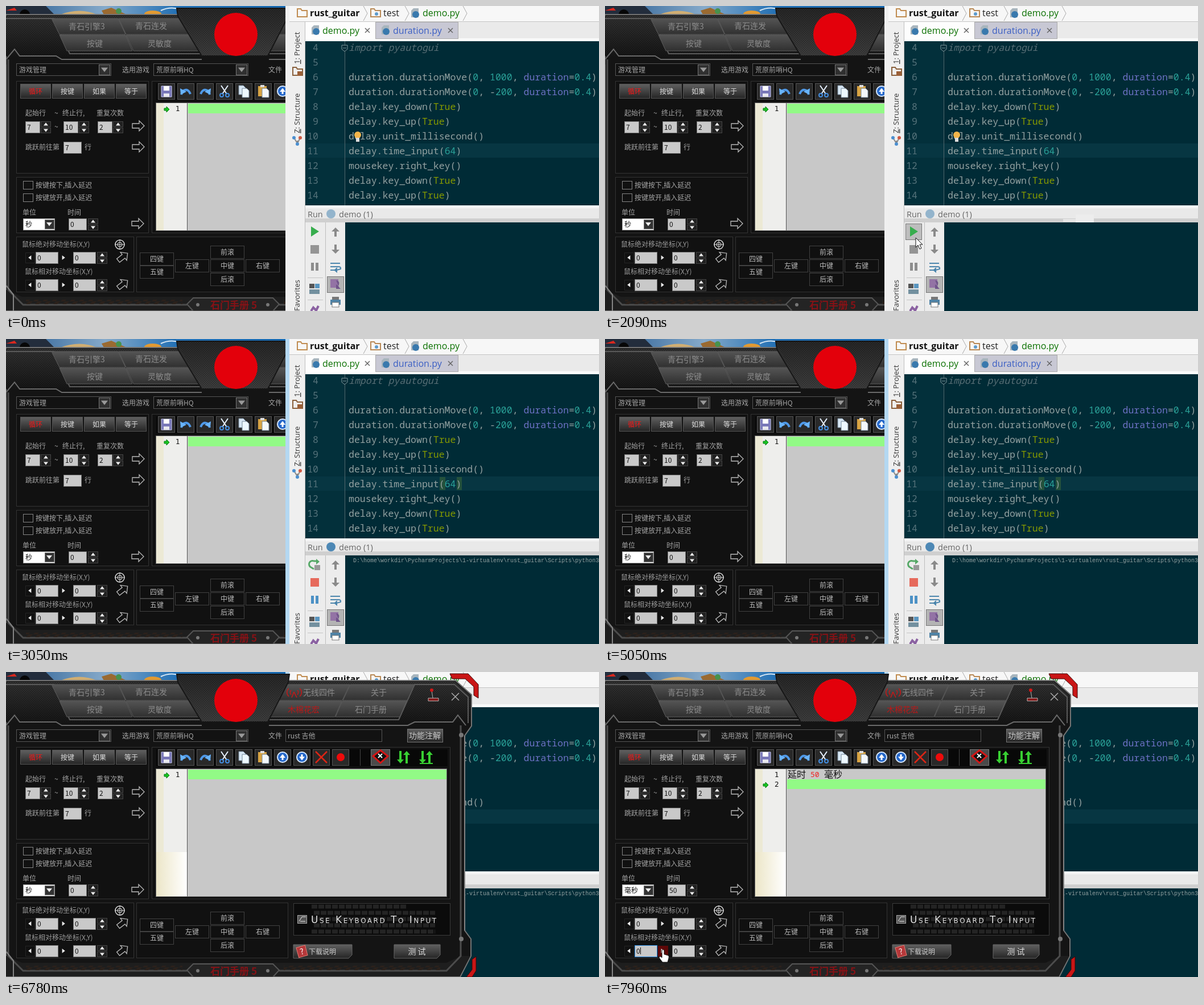
These frames come from a looping animation (1042x537 px, 8000 ms). An HTML page:

```html
<!DOCTYPE html>
<html lang="zh-CN">
<head>
<meta charset="utf-8">
<title>Macro editor</title>
<style>
html, body { margin: 0; width: 100%; height: 100%; overflow: hidden; background: #111; }
svg { display: block; width: 1042px; height: 537px; }
text { font-family: "Noto Sans CJK SC", "Noto Sans CJK", sans-serif; white-space: pre; }
.ui { font-family: "Open Sans", "Noto Sans", sans-serif; }
.code { font-family: "Noto Sans Mono", "DejaVu Sans Mono", monospace; font-size: 16.55px; }
.out { font-family: "Liberation Mono", monospace; font-size: 10px; }
.num { font-family: "DejaVu Sans", sans-serif; }
.wide { font-family: "DejaVu Sans", sans-serif; font-variant: small-caps; letter-spacing: 2.5px; }
</style>
</head>
<body>
<svg id="root" viewBox="0 0 1042 537" xmlns="http://www.w3.org/2000/svg">
<defs>
  <linearGradient id="tab" x2="0" y2="1"><stop stop-color="#545454"/><stop offset="1" stop-color="#303030"/></linearGradient>
  <linearGradient id="plate" x2="0" y2="1"><stop stop-color="#303030"/><stop offset="1" stop-color="#161616"/></linearGradient>
  <linearGradient id="key" x2="0" y2="1"><stop stop-color="#606060"/><stop offset="1" stop-color="#252525"/></linearGradient>
  <linearGradient id="badge" x2="0" y2="1"><stop stop-color="#262626"/><stop offset="1" stop-color="#3c3c3c"/></linearGradient>
  <linearGradient id="sea"><stop stop-color="#26364c"/><stop offset=".1" stop-color="#3f6f9f"/><stop offset=".35" stop-color="#86aaca"/><stop offset=".6" stop-color="#2471b5"/><stop offset="1" stop-color="#1767ad"/></linearGradient>
  <linearGradient id="cream"><stop stop-color="#ece6c8"/><stop offset="1" stop-color="#fff"/></linearGradient>
  <pattern id="mesh" width="4" height="4" patternUnits="userSpaceOnUse"><path d="M0 0h1v1h-1zM2 2h1v1h-1z" fill="#000" opacity=".5"/></pattern>
  <pattern id="hazard" width="16" height="8" patternUnits="userSpaceOnUse"><path d="M0 8L8 0H15L7 8Z" fill="#2b211b"/></pattern>
</defs>
<g id="desk"></g><g id="app"></g><g id="ide"></g><g id="cursor"></g>
</svg>
<script>
const $ = id => document.getElementById(id);
const rect = (x, y, w, h, fill, more = '') => `<rect x="${x}" y="${y}" width="${w}" height="${h}" fill="${fill}" ${more}/>`;
const box = (x, y, w, h, fill, line) => rect(x + .5, y + .5, w - 1, h - 1, fill, `stroke="${line}"`);
const path = (d, fill, line = 'none', width = 1, more = '') => `<path d="${d}" fill="${fill}" stroke="${line}" stroke-width="${width}" ${more}/>`;
const dot = (x, y, r, fill, more = '') => `<circle cx="${x}" cy="${y}" r="${r}" fill="${fill}" ${more}/>`;
const text = (x, y, s, fill = '#a6a6a6', size = 12, more = '') => `<text x="${x}" y="${y}" fill="${fill}" font-size="${size}" ${more}>${s}</text>`;
const mid = (x, y, s, fill, size, more = '') => text(x, y, s, fill, size, 'text-anchor="middle" ' + more);
const group = (id, body) => `<g id="${id}">${body}</g>`;
const at = (x, y, body, turn = 0) => `<g transform="translate(${x} ${y}) rotate(${turn})">${body}</g>`;
const tri = (x, y, turn, fill = '#eee', s = 4) => at(x, y, path(`M${-s} ${s * .6}H${s}L0 ${-s * .7}Z`, fill), turn);

// ---- desktop ----
$('desk').innerHTML = rect(0, 0, 1042, 537, '#10141a') + rect(0, 0, 498, 18, 'url(#sea)') +
  path('M0 0H70L85 15H0Z', '#232d3c') + path('M0 8L15 3L19 8Z', '#d8281f') + dot(33, 15, 9, '#070707') +
  path('M95 15Q130 2 160 15Z', '#d0ae73') + path('M168 8L185 3L212 15H172Z', '#9a6a31') +
  dot(198, 9, 5, '#47924d') + `<ellipse cx="258" cy="14" rx="15" ry="6" fill="#e29a32"/>` +
  path('M272 8Q288 0 308 6Q325 10 345 4', 'none', '#d7e7f4', 2);

// ---- macro tool ----
const line = '#3b3b3b';
const panel = (x, y, w, h) => box(x, y, w, h, '#111', '#333');
const field = (x, y, w, s, id = '') => box(x, y, w, 21, '#c9c9c9', '#777') + text(x + 3, y + 15, s, '#111', 12, id && `id="${id}"`);
const spinner = (x, y) => box(x, y, 18, 10, '#202020', '#444') + box(x, y + 11, 18, 10, '#202020', '#444') +
  tri(x + 9, y + 5, 0) + tri(x + 9, y + 16, 180);
const arrow = (x, y, turn = 0) => at(x, y, path('M-10 -4H2V-9L11 0L2 9V4H-10Z', '#111', '#bbb', 1.3), turn);
const combo = (x, s) => box(x, 101, 167, 22, '#121212', '#555') + text(x + 5, 117, s) +
  box(x + 145, 103, 20, 19, '#303030', '#777') + tri(x + 155, 112, 180, '#999', 6);
const check = (y, s) => box(30, y, 18, 15, '#111', '#858585') + text(52, y + 12, s);
const button = (x, y, s) => box(x, y, 60, 23, '#101010', '#414141') + mid(x + 30, y + 16, s, '#bbb', 12);
const tabs = (shape, x, y, s, fill = '#8b8b8b') => path(shape, 'url(#tab)', '#5c5c5c') + mid(x, y, s, fill, 14);
const curve = path('M-8 6C-5 -5 4 -5 8 5', 'none', '#4f99e8', 4) + path('M-10 -5L-9 6L1 1Z', '#69b4ff');
const sheet = (x, y, fill) => path(`M${x} ${y}h8l4 4v12h-12Z`, fill, '#789');
const disc = turn => dot(0, 0, 9, '#2467c9', 'stroke="#d9eaff" stroke-width="2"') + tri(0, -2, turn, '#fff', 5) + rect(-1.5, -4, 3, 9, '#fff');
const icons = [
  path('M-9 -9H9V10H-9Z', '#7978b8', '#c7c9f0') + rect(-5, -9, 10, 8, '#fff') + rect(-5, 4, 10, 6, '#e8e8ee'),
  curve, `<g transform="scale(-1 1)">${curve}</g>`,
  path('M-6 -10L4 5M6 -10L-4 5', 'none', '#e7f2ff', 2) + dot(-5, 7, 3, 'none', 'stroke="#448ee0" stroke-width="2"') + dot(5, 7, 3, 'none', 'stroke="#448ee0" stroke-width="2"'),
  sheet(-9, -10, '#d7e7f4') + sheet(-3, -5, '#edf8ff'),
  rect(-9, -9, 15, 18, '#d8a443') + rect(-5, -11, 7, 4, '#ddd') + sheet(-2, -5, '#f4f8fb'),
  disc(0), at(0, 0, disc(0), 180),
  path('M-10 -10L10 10M10 -10L-10 10', 'none', '#dc2515', 2.5), dot(0, 0, 7, '#ee0b0b')
];
const toolbar = icons.map((icon, i) => box(267 + i * 34, 136, 30, 29, '#292929', '#555') + at(282 + i * 34, 150, icon)).join('');
const greenArrow = (x, y, turn) => at(x, y, path('M-2 11V-4H-6L0 -11L6 -4H2V11Z', '#38cf32'), turn);
const moveRow = (y, label, x, hot = '') => text(x, y - 9, label, '#9c9c9c') + box(34, y + 1, 17, 19, '#111', '#252525') + tri(42, y + 10, -90) +
  hot + tri(101, y + 10, 90) + field(52, y, 40, '0') + field(118, y, 40, '0') + spinner(160, y) + arrow(205, y + 9, -38);
const pointer = group('rowArrow', path('M278 180H282V177L287 182L282 187V184H278Z', '#18c522', '#087b10'));

$('app').innerHTML =
  path('M0 15H790L818 40V95L806 112V455L817 470V500L798 537H0Z', '#141414', '#747474', 2) +
  path('M0 17H789L816 41V88H0Z', 'url(#plate)') + path('M0 17H789L816 41V88H0Z', 'url(#mesh)') +
  path('M0 500L28 512H774L800 500H816L797 536H0Z', '#1e1e1e') +
  path('M780 3H812L830 22V46L822 41V26L807 12H784Z', '#c91616', '#3a0808') + path('M826 501V526L819 537H809L819 524V506Z', '#c91616', '#3a0808') +
  path('M0 22H84L112 84H345M460 84H690L718 22H788L812 44V90', 'none', '#5a5a5a', 2) +
  tabs('M80 22H197L210 50H94Z', 142, 41, '青石引擎3') + tabs('M198 22H310L330 50H211Z', 255, 40, '青石连发') +
  tabs('M94 51H210L222 79H107Z', 156, 71, '按键') + tabs('M211 51H330L348 79H224Z', 270, 71, '灵敏度') +
  tabs('M480 22H604L591 50H466Z', 550, 41, '无线四件') + tabs('M605 22H718L705 50H592Z', 655, 41, '关于') +
  tabs('M466 51H590L578 79H454Z', 523, 71, '木棉花宏', '#bd1717') + tabs('M591 51H704L692 79H579Z', 641, 71, '石门手册') +
  path('M300 4H498L496 18L460 88H344L302 18Z', 'url(#badge)', '#161616', 2) + path('M300 4H498L460 88H344Z', 'url(#mesh)') +
  dot(404, 50, 38, '#e3000b') +
  path('M497 43a9 9 0 0 1 0 -14M516 43a9 9 0 0 0 0 -14M501 40a6 6 0 0 1 0 -8M512 40a6 6 0 0 0 0 -8M506 35L502 45M506 35L511 45', 'none', '#c91717', 1.5) +
  path('M742 46H760V51H742ZM750 46L748 33', '#871717', '#b6b6b6') + dot(748, 32, 3, '#d21818') +
  path('M783 37L796 50M796 37L783 50', 'none', '#aaa', 1.5) +
  path('M0 94L15 76L24 88H88L98 94H344M462 94H706L718 88H785L794 76L808 94', 'none', '#6a6a6a', 2) +
  path('M4 94V500L30 526H318M799 94V500L774 526H480', 'none', '#4c4c4c', 3) +
  path('M0 103V492L13 508V537M806 112V455', 'none', '#858585', 2) + dot(800, 111, 4, '#777') + dot(800, 470, 4, '#777') +
  combo(18, '游戏管理') + text(204, 117, '选用游戏') + combo(259, '荒原前哨HQ') +
  text(461, 117, '文件') + box(491, 101, 170, 22, '#121212', '#555') + text(495, 117, 'rust 吉他') +
  box(705, 100, 63, 24, 'url(#key)', '#777') + mid(736, 117, '功能注解', '#ccc', 14) +
  panel(18, 132, 233, 163) + panel(18, 301, 233, 99) + panel(18, 406, 207, 98) + panel(229, 406, 267, 98) + panel(256, 132, 525, 268) +
  ['循环', '按键', '如果', '等于'].map((s, i) => box(25 + i * 56, 137, 54, 26, 'url(#key)', '#555') + mid(52 + i * 56, 155, s, i ? '#ddd' : '#f01717', 12)).join('') +
  text(34, 193, '起始行') + text(85, 193, '~') + text(99, 193, '终止行,') + text(159, 193, '重复次数') +
  field(34, 203, 26, '7') + spinner(61, 203) + text(85, 217, '~') + field(101, 203, 26, '10') + spinner(128, 203) +
  field(161, 203, 26, '2') + spinner(188, 203) + arrow(232, 211) +
  text(34, 253, '跳跃前往第') + field(101, 239, 32, '7') + text(138, 253, '行') + arrow(232, 248) +
  check(308, '按键按下,插入延迟') + check(330, '按键放开,插入延迟') + text(29, 368, '单位') + text(108, 368, '时间') +
  box(30, 374, 56, 21, '#fff', '#999') + group('open', box(30, 374, 56, 21, '#cee8fa', '#3795dc')) + text(34, 389, '秒', '#111', 12, 'id="unit"') +
  box(68, 376, 17, 17, '#333', '#777') + tri(76, 384, 180, '#eee', 5) +
  field(110, 374, 32, '0', 'delay') + spinner(144, 374) + arrow(231, 383) +
  moveRow(433, '鼠标绝对移动坐标(X,Y)', 28) + moveRow(481, '鼠标相对移动坐标(X,Y)', 33, rect(93, 482, 18, 19, '#5e0808', 'id="hot"')) +
  group('focus', box(52, 481, 40, 21, 'none', '#2c8ee5') + rect(62, 485, 1, 12, '#111')) +
  dot(200, 420, 8, '#111', 'stroke="#ddd" stroke-width="1.5"') + dot(200, 420, 4, 'none', 'stroke="#ddd"') + path('M191 420H209M200 411V429', 'none', '#ddd') +
  button(235, 434, '四键') + button(235, 457, '五键') + button(297, 446, '左键') + button(359, 422, '前滚') +
  button(359, 446, '中键') + button(359, 470, '后滚') + button(421, 446, '右键') +
  rect(264, 136, 512, 30, '#080808') + toolbar + rect(622, 136, 1, 29, '#444') +
  box(641, 136, 34, 29, '#4a4a4a', '#777') + path('M645 148L658 138L671 148L658 160Z', '#111', '#d51616', 3) + path('M654 144L661 151M661 144L654 151', 'none', '#fff', 2) +
  greenArrow(693, 150, 180) + greenArrow(704, 150, 0) + greenArrow(732, 150, 180) + greenArrow(744, 150, 0) + path('M727 161H750', 'none', '#38cf32', 2) +
  box(263, 170, 512, 226, '#c8c8c8', '#666') + rect(264, 171, 13, 224, '#ece9d5') + rect(277, 171, 41, 224, '#eeeeec') +
  group('lit', rect(264, 317, 54, 78, 'url(#cream)')) + rect(318, 171, 1, 224, '#555') +
  rect(320, 172, 454, 17, '#92fa86', 'id="row"') + pointer + text(298, 185, '1', '#111', 12, 'class="num"') +
  group('added', text(298, 202, '2', '#111', 12, 'class="num"') + text(321, 186, '延时', '#111', 16) +
    text(361, 185, '50', '#ef2020', 13, 'class="code" style="font-size:13px"') + text(385, 186, '毫秒', '#111', 16)) +
  box(505, 407, 276, 57, '#0b0b0b', line) +
  [413, 424, 435, 446, 457].map((y, i) => path(`M${537 + i % 2 * 4} ${y}H${i ? 754 : 705}`, 'none', '#242424', 7, 'stroke-dasharray="10 2"')).join('') +
  box(512, 428, 17, 15, '#555', '#aaa') + path('M515 439L520 431H527M517 439H526', 'none', '#eee') + text(536, 442, 'Use Keyboard To Input', '#e2e2e2', 17, 'class="wide"') +
  path('M505 480H608V498L602 504H505Z', 'url(#key)', '#666') + at(520, 492, rect(-8, -9, 16, 18, '#b5383a', 'stroke="#e47a72"') + mid(0, 5, '?', '#fff', 14), -15) + text(532, 497, '下载说明', '#ccc') +
  path('M682 480H763V498L757 504H682Z', 'url(#key)', '#666') + mid(722, 497, '测 试', '#ddd', 14) +
  rect(35, 517, 275, 8, 'url(#hazard)') + rect(488, 517, 275, 8, 'url(#hazard)') +
  path('M318 525L329 514H469L480 525L469 537H329Z', '#242424', '#555', 2) + dot(337, 526, 3, '#777') + dot(460, 526, 3, '#777') + mid(400, 533, '石门手册 5', '#861216', 17, 'font-weight="bold"') +
  group('menu', box(30, 394, 56, 41, '#c8c8c8', '#333') + rect(31, 408, 54, 13, '#168bea') +
    ['秒', '毫秒', '分'].map((s, i) => text(33, 406 + i * 13, s, i === 1 ? '#fff' : '#111', 12)).join(''));

// ---- code editor ----
const ui = 'class="ui"';
const folder = (x, y, fill) => path(`M${x} ${y}h6l2 3h9v11h-17Z`, 'none', fill, 2);
const pyFile = (x, y) => path(`M${x + 5} ${y}h9v16h-13v-12Z`, '#a8b5bd') + dot(x + 9, y + 11, 6, '#3979ad');
const chevron = x => path(`M${x - 4} 0L${x + 3} 13L${x - 4} 26`, 'none', '#aaa');
const cross = x => path(`M${x - 4} 39l8 8m0 -8l-8 8`, 'none', '#666', 1.5);
const side = (y, s) => at(516, y, text(0, 0, s, '#333', 13, ui), -90);
const colors = { T: '#859900', d: '#6c71c4' };
const tint = s => s.replace(/True|\d+(?:\.\d+)?|duration(?==)/g, m => `<tspan fill="${colors[m[0]] || '#2aa198'}">${m}</tspan>`);
const lines = ['import pyautogui', '', 'duration.durationMove(0, 1000, duration=0.4)', 'duration.durationMove(0, -200, duration=0.4)',
  'delay.key_down(True)', 'delay.key_up(True)', 'delay.unit_millisecond()', 'delay.time_input(64)', 'mousekey.right_key()',
  'delay.key_down(True)', 'delay.key_up(True)'];
const source = lines.map((s, i) => text(549, 79 + i * 26, i + 4, '#56737b', 16, 'class="code" text-anchor="end"') +
  text(602, 79 + i * 26, tint(s), i ? '#93a1a1' : '#586e75', 16, `class="code" ${i ? '' : 'font-style="italic"'}`)).join('');
const upDown = turn => path('M-2 8V-1H-7L0 -8L7 -1H2V8Z', '#8a8a8a', 'none', 1, `transform="rotate(${turn})"`);

$('ide').innerHTML =
  rect(491, 0, 551, 537, '#f0f0f0') + rect(491, 0, 7, 537, '#f0f0f0', 'id="edge"') + rect(498, 0, 544, 27, '#f7f7f7') + rect(498, 27, 544, 1, '#c4c4c4') +
  folder(512, 5, '#c08c50') + text(534, 18, 'rust_guitar', '#111', 16, ui + ' font-weight="bold"') + chevron(632) +
  folder(641, 5, '#b98a56') + dot(651, 14, 3, '#5e9bcb') + text(663, 18, 'test', '#222', 16, ui) + chevron(705) + pyFile(711, 4) + text(732, 18, 'demo.py', '#0a7000', 16, ui) + chevron(807) +
  rect(526, 28, 516, 29, '#eaeaea') + rect(526, 57, 516, 5, '#fbfbfb') + rect(526, 28, 124, 34, '#fdfdfd') +
  pyFile(536, 34) + text(556, 49, 'demo.py', '#0a7000', 16, ui) + cross(635) +
  box(649, 28, 146, 30, '#c8c8d4', '#aaa') + pyFile(659, 34) + text(680, 49, 'duration.py', '#3b5fc4', 16, ui) + cross(781) +
  rect(498, 28, 27, 509, '#efefef') + rect(525, 28, 1, 509, '#bdbdbd') +
  side(102, '<tspan text-decoration="underline">1</tspan>: Project') + side(224, '<tspan text-decoration="underline">Z</tspan>: Structure') + side(537, 'Favorites') +
  folder(504, 108, '#8a603c') + rect(512, 115, 8, 8, '#9b6038') +
  path('M506 232L512 242L517 232M512 237V243', 'none', '#888', 2) + dot(506, 232, 3, '#4b8fd0') + dot(517, 232, 3, '#cf5b45') + dot(512, 243, 3, '#4b8fd0') +
  rect(526, 62, 516, 289, '#002b36') + rect(526, 62, 69, 289, '#03303b') + rect(526, 242, 516, 25, '#073642') + rect(595, 62, 1, 289, '#52676d') +
  path('M590 69H600V76L595 80L590 76ZM592 74H598', '#002b36', '#82959a') +
  group('match', rect(762, 243, 10, 23, '#24513c') + rect(792, 243, 9, 23, '#24513c')) + source +
  group('bulb', dot(618, 227, 6, '#f5b54a') + rect(615, 232, 6, 7, '#ddd')) + rect(801, 242, 3, 25, '#dc322f', 'id="caret"') +
  rect(526, 351, 516, 30, '#e9e9e9') + rect(526, 351, 516, 5, '#f6f6f6') + rect(526, 374, 516, 7, '#cfcfcf') +
  group('trail', rect(827, 367, 32, 14, '#ededed') + rect(805, 375, 22, 5, '#e6e6e6')) +
  text(530, 372, 'Run', '#666', 14.5, ui) + dot(571, 366, 8, '#4d88b5', 'id="runIcon"') + text(585, 372, 'demo (1)', '#666', 14.5, ui) +
  rect(526, 381, 70, 156, '#ececec') + rect(561, 381, 1, 156, '#bdbdbd') + rect(596, 381, 446, 156, '#002b36') +
  group('pressed', box(528, 383, 29, 29, '#bdbdbd', '#777')) +
  group('idle', path('M536 388L550 397L536 406Z', '#37ad4d')) +
  group('rerun', path('M546 391H541A6 6 0 0 0 536 402L541 405', 'none', '#55a866', 3) + path('M545 387L551 392L545 397Z', '#55a866') + rect(542, 398, 10, 9, '#999')) +
  rect(535, 421, 15, 15, '#949494', 'id="stop"') + path('M536 452H541V466H536ZM544 452H549V466H544Z', '#8d8d8d', 'none', 1, 'id="pause"') +
  rect(530, 478, 27, 1, '#c4c4c4') + rect(533, 489, 9, 8, '#555') + rect(543, 489, 8, 8, '#5a95bf') + rect(533, 499, 18, 8, '#73909f') + rect(530, 517, 27, 1, '#c4c4c4') +
  path('M536 537L540 531L545 536L549 528', 'none', '#8b62a2', 4) +
  at(579, 398, upDown(0)) + at(579, 428, upDown(180)) +
  path('M570 453H587M570 459H584Q589 459 588 463L581 465M570 465H577', 'none', '#4c86ad', 2) + path('M582 460V470L576 465Z', '#4c86ad') +
  box(564, 476, 30, 29, '#b4b4b4', '#777') + rect(570, 481, 14, 15, '#9373a5') + path('M580 483Q588 484 584 493L580 490V498H588L585 495', '#70558a') +
  rect(573, 512, 12, 6, '#777') + rect(570, 517, 18, 9, '#4f83a6') + rect(573, 522, 12, 8, '#fff', 'stroke="#777"') +
  text(610, 393, 'D:\\home\\workdir\\PycharmProjects\\1-virtualenv\\rust_guitar\\Scripts\\python3.exe', '#93a1a1', 10, 'class="out" id="output"');

// ---- pointer shapes, each drawn around its hot spot ----
$('cursor').innerHTML =
  group('beam', path('M-4 -7.5H-1L0 -6.5L1 -7.5H4M0 -7V7M-4 7.5H-1L0 6.5L1 7.5H4', 'none')) +
  group('point', path('M0 0V17L4 13L7 20L10 18.5L7 12H12Z', '#fff', '#111')) +
  group('hand', path('M-2 0Q0 -3 2 0V7L9 9Q11 10 10 14L8 21H-1L-7 13Q-7 10 -4 11L-2 13Z', '#fff', '#111'));

const tick = 57.5, bursts = [6550, 2390, 1550, 470, 0];
function sampled(t) {
  const from = bursts.find(b => t >= b);
  return from + Math.floor((t - from) / tick) * tick;
}

const track = [
  [420, 776, 426], [560, 790, 414], [700, 821, 391], [757, 843, 382], [815, 866, 398], [940, 915, 436], [1120, 970, 526], [1170, 971, 560],
  [1540, 920, 545], [1550, 915, 530], [1665, 812, 492], [1780, 715, 458], [1900, 625, 428], [2060, 546, 408],
  [2480, 546, 408], [2600, 600, 388], [2700, 700, 352], [2850, 780, 327],
  [6550, 780, 327], [6720, 134, 382], [6950, 134, 382], [7060, 76, 384], [7120, 76, 384], [7230, 53, 411],
  [7300, 53, 411], [7520, 231, 383], [7580, 231, 383], [7760, 70, 490], [7820, 70, 490], [7920, 102, 490]
];
function position(t) {
  const i = track.findIndex(k => k[0] > t);
  if (i < 1) return (i ? track[track.length - 1] : track[0]).slice(1);
  const [t0, x0, y0] = track[i - 1], [t1, x1, y1] = track[i], p = (t - t0) / (t1 - t0);
  return [x0 + (x1 - x0) * p, y0 + (y1 - y0) * p];
}
function pointerShape(t, x, y) {
  if (t >= 7900) return 'hand';
  if (x > 491) return x > 596 && (y < 351 || y >= 381) ? 'beam' : 'point';
  const overDelay = x > 110 && x < 142 && y > 374 && y < 395;
  const overStep = x > 52 && x < 92 && y > 481;
  return overDelay || overStep ? 'beam' : 'point';
}
const show = (id, on) => $(id).setAttribute('visibility', on ? 'visible' : 'hidden');
const paint = (id, fill) => $(id).setAttribute('fill', fill);
let appInFront = null;

function render(now) {
  const t = sampled(now);
  const active = t >= 2390, running = t >= 2500, front = t >= 6780, added = t >= 7570;
  if (front !== appInFront) {
    $('root').append($(front ? 'app' : 'ide'), $('cursor'));
    appInFront = front;
  }
  const [x, y] = position(t), shape = pointerShape(t, x, y);
  $('cursor').setAttribute('transform', `translate(${Math.round(x)} ${Math.round(y)})`);
  for (const id of ['beam', 'point', 'hand']) show(id, id === shape);
  $('beam').setAttribute('stroke', x > 491 ? '#d4d8d8' : '#111');

  paint('edge', active ? '#b4d8f2' : '#f0f0f0');
  show('match', active);
  show('bulb', !active);
  show('caret', now >= 2550 && Math.floor((now - 2550) / 500) % 2 === 0);
  show('trail', t >= 755 && !active);
  show('pressed', t >= 2000 && !running);
  show('idle', !running);
  show('rerun', running);
  show('output', running);
  paint('stop', running ? '#e66a5c' : '#949494');
  paint('pause', running ? '#4c91c5' : '#8d8d8d');
  $('runIcon').setAttribute('opacity', running ? 1 : .55);

  const chosen = t >= 7290, menu = t >= 7110 && !chosen;
  show('menu', menu);
  show('open', menu);
  show('lit', t >= 6720);
  $('unit').textContent = chosen ? '毫秒' : '秒';
  $('delay').textContent = t < 6890 ? '0' : t < 6950 ? '5' : '50';
  show('added', added);
  $('row').setAttribute('y', added ? 189 : 172);
  $('rowArrow').setAttribute('transform', `translate(0 ${added ? 17 : 0})`);
  show('focus', t >= 7800);
  show('hot', t >= 7900);
}

const start = performance.now();
(function frame() {
  render((performance.now() - start) % 8000);
  requestAnimationFrame(frame);
})();
</script>
</body>
</html>
```
